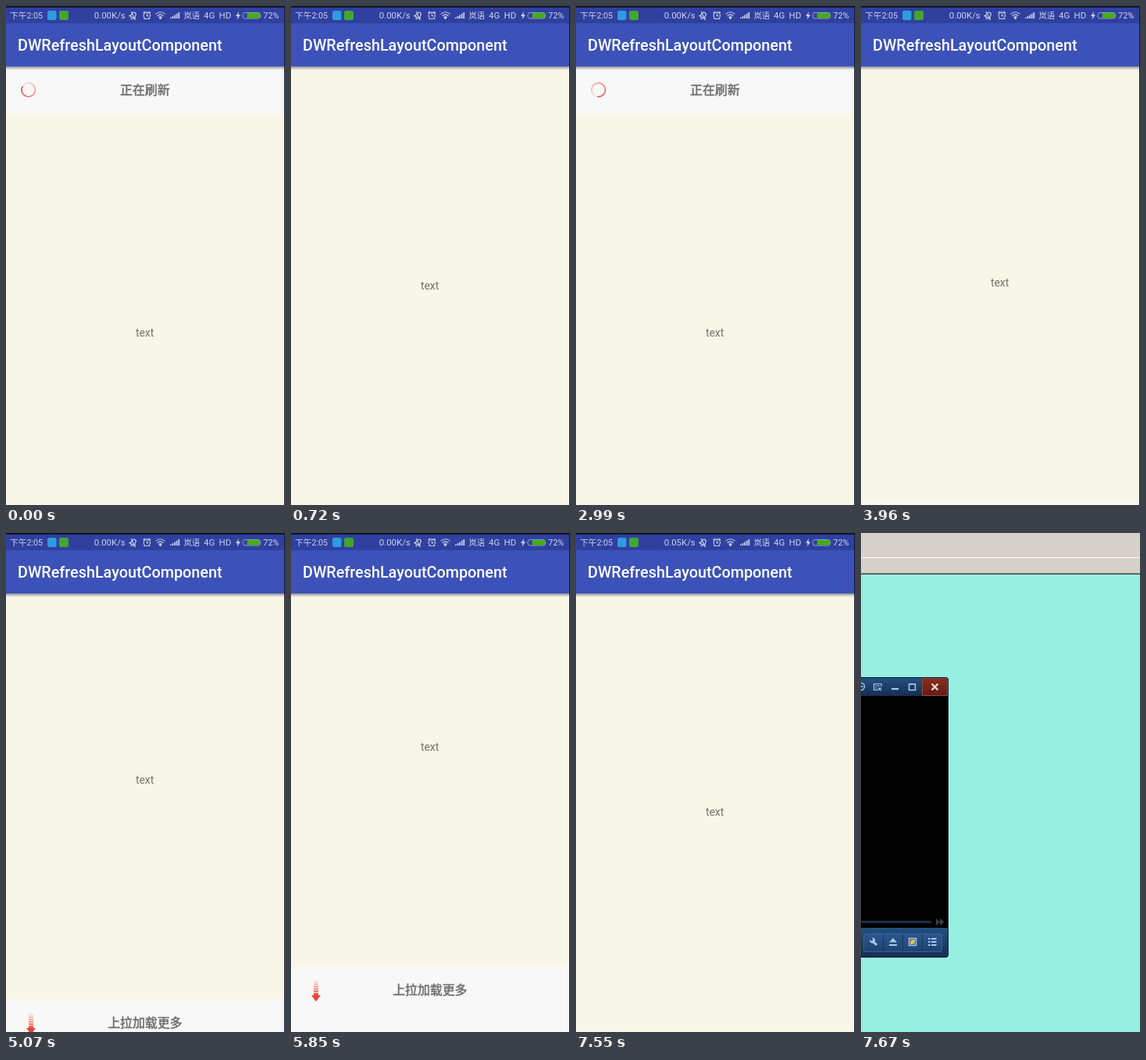
Recreate the animation shown at these times as an HTML page. Size 357 px wide and 637 px high, loop 8340 ms.

```html
<!DOCTYPE html>
<html lang="zh">
<head>
<meta charset="utf-8">
<title>Pull to refresh</title>
<style>
html, body { margin: 0; width: 100%; height: 100%; overflow: hidden; background: #f8f8f8; }
svg { display: block; width: 357px; height: 637px; }
text { font-family: Roboto, "Noto Sans CJK SC", "Noto Sans CJK", sans-serif; }
.label {
  font: 15.9px "Noto Sans CJK SC", "Noto Sans CJK", sans-serif;
  fill: #6e6e6e; stroke: #6e6e6e; stroke-width: .5; text-anchor: middle;
}
.status { font-size: 11.4px; fill: #ccd2ec; }
.line { fill: none; stroke: #ccd2ec; stroke-width: 1.1; }
.ice { fill: none; stroke: #a9c8e8; stroke-width: 1.5; }
</style>
</head>
<body>
<svg viewBox="0 0 357 637">
  <defs>
    <linearGradient id="shade" x2="0" y2="1">
      <stop stop-color="#667" stop-opacity=".8"/><stop offset="1" stop-color="#999" stop-opacity="0"/>
    </linearGradient>
    <linearGradient id="navy" x2="0" y2="1">
      <stop stop-color="#24507f"/><stop offset="1" stop-color="#142e52"/>
    </linearGradient>
    <linearGradient id="button" x2="0" y2="1">
      <stop stop-color="#2c5890"/><stop offset="1" stop-color="#1f4272"/>
    </linearGradient>
    <linearGradient id="rust" x2="0" y2="1">
      <stop stop-color="#84301f"/><stop offset="1" stop-color="#641a12"/>
    </linearGradient>
    <linearGradient id="rainbow" x2="1" y2="1">
      <stop stop-color="#e8534a"/><stop offset=".5" stop-color="#e5cf4b"/><stop offset="1" stop-color="#43a5d8"/>
    </linearGradient>
    <g id="ring" fill="none" stroke="#ee3b2b" stroke-width="1.6"></g>
    <g id="arrow" fill="#ee4433"></g>
  </defs>

  <g id="phone">
    <rect width="357" height="637" fill="#f8f8f8"/>
    <g id="page">
      <rect y="77" width="356" height="560" fill="#f8f6e7"/>
      <text x="177.6" y="362" text-anchor="middle" font-size="13.9" fill="#72716c">text</text>
    </g>
    <g id="head">
      <use class="pull" href="#arrow" x="32" y="1"/>
      <use class="spin" href="#ring"/>
      <text class="label" x="177.8" y="6"></text>
    </g>
    <g id="foot">
      <use class="pull" href="#arrow" x="32" y="1"/>
      <use class="spin" href="#ring"/>
      <text class="label" x="177.8" y="6"></text>
    </g>

    <rect y="77" width="356" height="5" fill="url(#shade)"/>
    <rect y="22" width="356" height="55" fill="#3c52b8"/>
    <rect width="356" height="22" fill="#2f409f"/>
    <text x="15" y="57" font-size="19.8" font-weight="500" fill="#fff">DWRefreshLayoutComponent</text>

    <g class="status">
      <text x="5" y="16" font-size="10.7">下午2:05</text>
      <rect x="53" y="6" width="11.5" height="12" rx="2.5" fill="#2f9be0"/>
      <rect x="68" y="6" width="12" height="12" rx="2.5" fill="#43a62f"/>
      <text id="speed" x="112.8" y="16"></text>
      <text x="227.5" y="16" font-size="10.3">岚语</text>
      <text x="253" y="16">4G</text>
      <text x="272.5" y="16">HD</text>
      <text x="329" y="16" font-size="11">72%</text>
      <path d="M298 7l-4 6h2.6l-1 4.5l4.4-6.2h-2.7z"/>
      <path d="M210 16v-1.5h1.7V16zM212.6 16v-3h1.7v3zM215.200 16v-4.600h1.7V16zM217.800 16v-6.300h1.7V16zM220.400 16V8h1.7v8z"/>
      <circle cx="197.5" cy="15.5" r="1.4"/>
    </g>
    <g class="line">
      <path d="M191.5 10.3q6-5 12 0M193.5 12.6q4-3.4 8 0M195.300 14.400q2.200-1.600 4.400 0"/>
      <path d="M-4 3q1.500-1.500 1.500-4a2.500 3 0 0 1 5 0q0 2.500 1.500 4zM-1.500 5h3M-5-3L5 4" transform="translate(163 12) rotate(30)"/>
      <circle cx="180.300" cy="12.300" r="4.200"/>
      <path d="M180.300 9.800v2.800h2M175.500 9l2.500-2.200M185 9l-2.500-2.200M177.500 15.800l-1 1.200M183 15.800l1 1.200"/>
      <rect x="303" y="8.500" width="22.500" height="7.500" rx="3" stroke-width=".8" opacity=".8"/>
    </g>
    <rect x="308.500" y="9" width="16.500" height="6.500" rx="1.500" fill="#45ad16"/>
    <path d="M0 1H357" stroke="#10142a" stroke-width="2"/>
    <path d="M356.500 0V637" stroke="#10142a"/>
  </g>

  <g id="desk">
    <rect width="357" height="637" fill="#96f0e2"/>
    <rect width="357" height="52" fill="#d5d0c9"/>
    <path d="M0 31.500H357" stroke="#fff"/>
    <path d="M0 51.500H357" stroke="#85817b"/>
    <path d="M0 52.500H357" stroke="#45433f"/>

    <rect x="-9" y="184" width="121" height="358" rx="4" fill="#0b1c35"/>
    <path d="M0 185H78V208H0z" fill="url(#navy)"/>
    <path d="M78.500 185.500H108q2.500 0 2.500 2.500V207.500H78.500z" fill="url(#rust)" stroke="#94493c"/>
    <rect y="208" width="111" height="296" fill="#000"/>
    <rect y="495" width="90" height="3" rx="1" fill="#1a2c4c"/>
    <path d="M96 492l5 4.500l-5 4.500zM101 492l5.500 4.500l-5.500 4.500z" fill="#3b4046"/>
    <path d="M0 504H111V538q0 3-3 3H0z" fill="url(#navy)"/>
    <rect x="3.500" y="511.500" width="100" height="23" rx="2" fill="url(#button)" stroke="#3a6298"/>
    <path d="M28.500 512v22M53.500 512v22M78.500 512v22" stroke="#173559"/>

    <g class="ice">
      <circle cx="0" cy="196" r="4.500"/><path d="M0 196h2.500"/>
      <path d="M26 196v-3.500h-9.500v8H22M18 195h6M18 198h3M23 198l3 3M23 201v-3h3" stroke-width="1.200"/>
      <path d="M39 199h9" stroke-width="2.200"/>
      <path d="M61.500 193h8v7.500h-8zM61 192.800h9"/>
      <path d="M90.500 192.500l8 8M98.500 192.500l-8 8" stroke="#f0dcd6" stroke-width="2.200"/>
      <path d="M15.500 521.500l4.500 4.500" stroke-width="3"/>
      <path d="M14 516.500a3.600 3.600 0 1 1-3 3l2.800 1.500l1.700-1.700z" fill="#a9c8e8" stroke="none"/>
      <path d="M36 526h10" stroke-width="2"/>
      <path d="M36 522.500l5-5.500l5 5.500z" fill="#a9c8e8" stroke="none"/>
      <rect x="61.500" y="517.500" width="9" height="9"/>
      <rect x="63" y="519" width="6" height="6" fill="url(#rainbow)" stroke="none"/>
      <path d="M86 518h2.500M90 518h6.500M86 522h2.500M90 522h6.500M86 526h2.500M90 526h6.500" stroke-width="2"/>
    </g>
  </g>
</svg>
<script>
const $ = id => document.getElementById(id);
const LOOP = 8340, DESK_AT = 7670;

// The screen refreshes only at these beats: [first, last, count]
const beats = [0];
for (const [a, b, n] of [[140, 720, 5], [1310, 1850, 5], [2010, 2300, 3], [2450, 2990, 5],
  [3110, 3410, 3], [3530, 3960, 4], [4640, 5590, 8], [5730, 5850, 2], [6000, 6700, 6],
  [6820, 7550, 6], [DESK_AT, DESK_AT, 1]])
  for (let i = 0; i < n; i++) beats.push(n > 1 ? a + (b - a) * i / (n - 1) : a);

// Drag distance over time
const drag = [[0, 60], [100, 60], [285, 27], [430, 10], [575, 2], [720, 0], [1250, 0], [1850, 54],
  [2300, 86], [2585, 96], [2720, 78], [2855, 60], [3410, 60], [3530, 46], [3670, 17], [3820, 2],
  [3960, -4], [4600, -4], [5200, -55], [5590, -77], [5850, -84], [6000, -72], [6140, -60],
  [6700, -60], [6820, -50], [6966, -27], [7112, -11], [7258, -4], [7404, -1], [LOOP, -1]];

function offsetAt(t) {
  const i = drag.findIndex(k => k[0] > t);
  const [t0, a] = drag[i - 1], [t1, b] = drag[i];
  return a + (b - a) * (t - t0) / (t1 - t0);
}

const point = deg => {
  const r = deg * Math.PI / 180;
  return `${8.7 * Math.cos(r)} ${8.7 * Math.sin(r)}`;
};
let arcs = "";
for (let d = 0; d < 360; d += 10)
  arcs += `<path d="M${point(d)}A8.7 8.7 0 0 1 ${point(d + 10.5)}" opacity="${0.06 + 0.94 * d / 350}"/>`;
$("ring").innerHTML = arcs;

let bars = '<path d="M-6 6H6L0 14z"/>';
for (let i = 0; i < 6; i++)
  bars += `<rect x="-3" y="${3 * i - 12}" width="6" height="2.2" opacity="${0.18 + 0.13 * i}"/>`;
$("arrow").innerHTML = bars + '<rect x="-3" y="5" width="6" height="2"/>';

function setBar(id, y, busy, label, angle) {
  const bar = $(id), spin = bar.querySelector(".spin");
  bar.setAttribute("transform", `translate(0 ${y})`);
  bar.querySelector("text").textContent = label;
  bar.querySelector(".pull").style.display = busy ? "none" : "";
  spin.style.display = busy ? "" : "none";
  spin.setAttribute("transform", `translate(28.7 0) rotate(${angle})`);
}

function draw(now) {
  const time = now % LOOP;
  const t = beats.filter(b => b <= time + 0.01).pop();
  const off = Math.round(offsetAt(t)), angle = 210 + t / 1110 * 360;
  const refreshing = t < 720 || (t > 2650 && t < 3960), loading = t >= 6000;

  $("desk").style.display = t >= DESK_AT ? "" : "none";
  $("page").setAttribute("transform", `translate(0 ${off})`);
  setBar("head", 47 + off, refreshing, refreshing ? "正在刷新" : "下拉刷新", angle);
  setBar("foot", 667 + off, loading, loading ? "正在加载" : "上拉加载更多", angle);
  $("speed").textContent = t < 6140 ? "0.00K/s" : "0.05K/s";
}

const start = performance.now();
function tick() {
  draw(performance.now() - start);
  requestAnimationFrame(tick);
}
tick();
</script>
</body>
</html>
```
